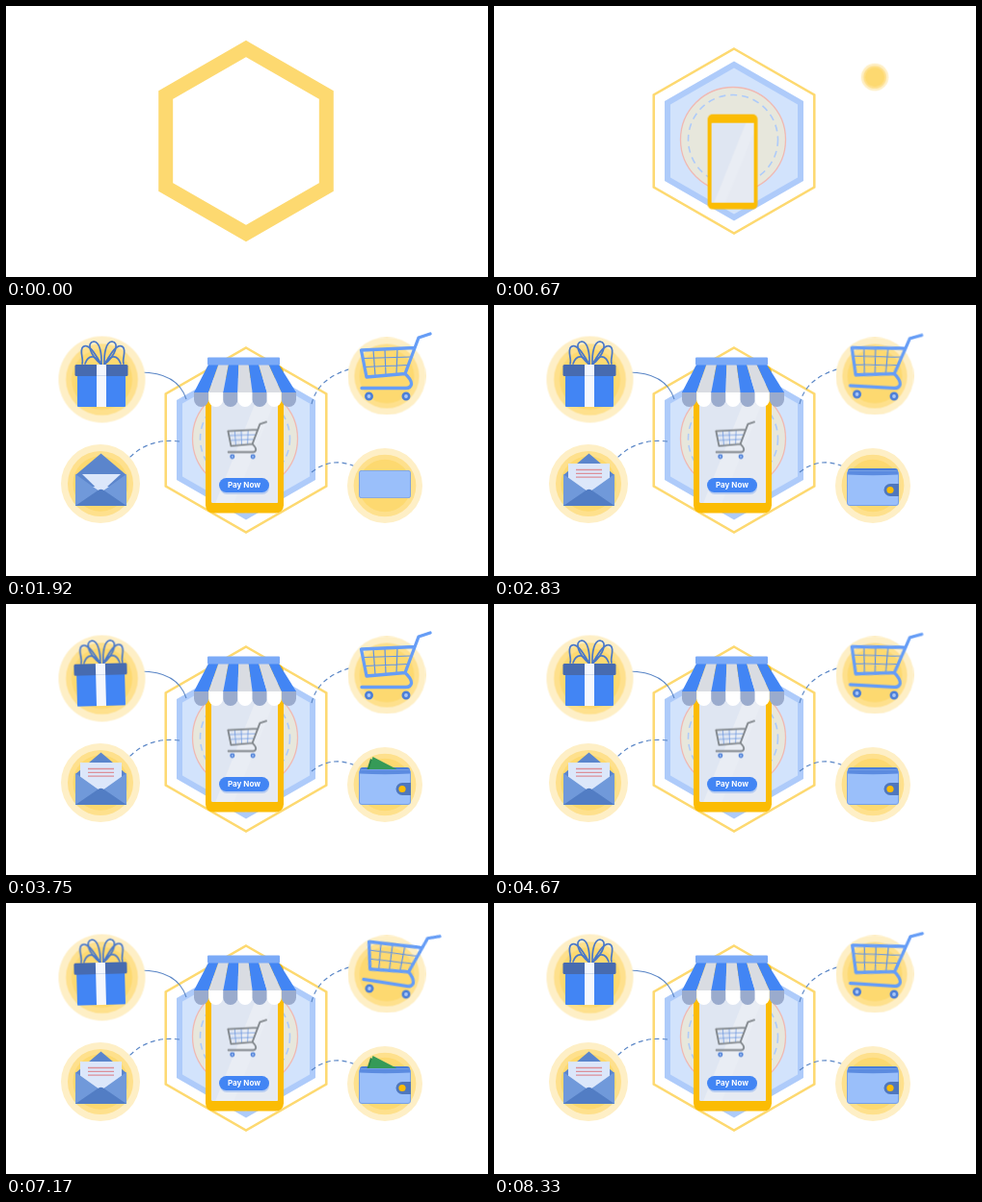
Recreate the animation shown at these times as an HTML page. Size 500x282 px, loop 8410 ms.

```html
<!DOCTYPE html>
<html lang="en">
<head>
<meta charset="utf-8">
<title>Mobile shop</title>
<style>
html, body { margin: 0; width: 100%; height: 100%; overflow: hidden; background: #fff; }
svg { display: block; width: 100vw; height: 100vh; }
g, path, circle, rect { stroke-linejoin: round; }
.line { fill: none; stroke-linecap: round; }
.anim { animation: 8410ms ease-out infinite; }

#frame { animation-name: thin; }
#core { animation-name: core; transform-origin: 249px 140.5px; }
#phone { animation-name: phone; transform-origin: 247.5px 202.5px; }
#awning { animation-name: awning; transform-origin: 248px 54px; }
#goods { animation-name: goods; transform-origin: 250px 142px; }
#button { animation-name: button; transform-origin: 247px 188px; }
#disc1 { animation-name: disc1; transform-origin: 395px 74px; }
#disc2 { animation-name: disc2; transform-origin: 99.5px 77.5px; }
#disc3 { animation-name: disc3; transform-origin: 98px 186px; }
#disc4 { animation-name: disc4; transform-origin: 393px 188px; }
#cartIn { animation-name: cartIn; transform-origin: 395px 74px; }
#cartTip { animation-name: tip; animation-timing-function: ease-in-out; transform-origin: 415px 95px; }
#gift { animation-name: disc2; transform-origin: 99px 106px; }
#giftSway { animation-name: sway; animation-timing-function: ease-in-out; transform-origin: 99px 106px; }
#mail { animation-name: disc3; transform-origin: 98px 209px; }
#letter { animation-name: letter; }
#wallet { animation-name: wallet; transform-origin: 393px 172px; }
.trim { animation-name: trim; }
#cash { animation-name: cash; animation-timing-function: ease-in-out; }
.draw { animation-name: draw; stroke-dasharray: 1; }

@keyframes thin { 0% { stroke-width: 15px } 6%, 100% { stroke-width: 2.5px } }
@keyframes core { 0%, 2% { transform: scale(0) } 6.5%, 100% { transform: none } }
@keyframes phone { 0%, 5.5% { transform: scale(0) } 10.9%, 100% { transform: none } }
@keyframes awning { 0%, 10.9% { transform: scale(1, 0) } 14.9%, 100% { transform: none } }
@keyframes goods { 0%, 13.9% { transform: scale(0) } 17.8%, 100% { transform: none } }
@keyframes button { 0%, 15.9% { transform: scale(0) } 19.8%, 100% { transform: none } }
@keyframes disc1 { 0%, 7.1% { transform: scale(0) } 10.9%, 100% { transform: none } }
@keyframes disc2 { 0%, 11.9% { transform: scale(0) } 15.9%, 100% { transform: none } }
@keyframes disc3 { 0%, 14.9% { transform: scale(0) } 18.9%, 100% { transform: none } }
@keyframes disc4 { 0%, 16.8% { transform: scale(0) } 20.8%, 100% { transform: none } }
@keyframes cartIn { 0%, 10.9% { transform: scale(0) } 15.9%, 100% { transform: none } }
@keyframes tip {
  0%, 22.8%, 44.6%, 66.4%, 88.2% { transform: none }
  27.6%, 49.4%, 71.2%, 93% { transform: rotate(13.5deg) }
  32.7%, 54.5%, 76.3%, 98.1% { transform: rotate(3deg) }
  40%, 41.8%, 61.8%, 63.6%, 83.6%, 85.4% { transform: rotate(9deg) }
  100% { transform: rotate(4.5deg) }
}
@keyframes sway {
  0%, 22.8%, 33.7%, 55.5%, 67.4%, 77.3%, 99%, 100% { transform: none }
  28%, 44.6%, 61%, 72%, 85.3%, 93% { transform: rotate(-1.5deg) }
}
@keyframes letter { 0%, 23.2% { transform: translateY(24px) } 31%, 100% { transform: none } }
@keyframes wallet { 0%, 18.8% { transform: scale(0) } 22.8% { transform: scale(1, .78) } 24.8%, 100% { transform: none } }
@keyframes trim { 0%, 22.9% { opacity: 0 } 24.8%, 100% { opacity: 1 } }
@keyframes cash {
  0%, 32%, 59%, 71%, 94%, 100% { transform: translateY(19px) }
  38%, 50%, 79%, 87% { transform: none }
}
@keyframes draw { 0%, 17% { stroke-dashoffset: 1 } 21.5%, 100% { stroke-dashoffset: 0 } }
</style>
</head>
<body>
<svg viewBox="0 0 500 282" preserveAspectRatio="none">
  <defs>
    <g id="disc">
      <circle r="1" fill="#feefc6"/>
      <circle r=".83" fill="#fee08c"/>
      <circle r=".7" fill="#fdd970"/>
    </g>
    <g id="trolley" class="line">
      <path d="M381 46.500 383 73.500M393 46 394 73M406 45.500 405 72M370 55.500 420 54M372 64.500 417 62.500" stroke="var(--grid)" stroke-width="1.200"/>
      <path d="M440 30 428 34 414 71.500 374 75 368.500 47 424 44.500M414 71.500Q421 78 420.500 82.500Q419.500 86.500 415 86.500H369" stroke="var(--bar)" stroke-width="3.300"/>
      <g fill="#a9c7fa" stroke="var(--wheel)" stroke-width="2.600">
        <circle cx="376.500" cy="95" r="3.200"/><circle cx="415" cy="95" r="3.200"/>
      </g>
    </g>
    <g id="loops">
      <path d="M99 62C93 52 86 39 80 43.500C75.500 47 81 57 79 61"/>
      <path d="M99 62C87 52 83 39 91 38C97 38 99.500 50 99 62"/>
      <path d="M99 62C94 53 86 50 82 61"/>
    </g>
    <clipPath id="screen"><rect x="213" y="76" width="69" height="130" rx="1.500"/></clipPath>
    <clipPath id="mouth"><path d="M66 140H131V176L98.500 195 66 176Z"/></clipPath>
    <clipPath id="slot"><path d="M360 150H428V177H360Z"/></clipPath>
    <g id="links">
      <path pathLength="var(--unit)" d="M187 98Q178 70 139 70"/>
      <path d="M317 103Q324 74 363 65"/>
      <path d="M180 142Q148 138 127 160"/>
      <path d="M317 174Q338 157 363 168.500"/>
    </g>
    <mask id="reveal" maskUnits="userSpaceOnUse" x="0" y="0" width="500" height="282">
      <g fill="none" stroke="#fff" stroke-width="6">
        <path class="anim draw" pathLength="1" d="M187 99Q178 70 138 70"/>
        <path class="anim draw" pathLength="1" d="M317 104Q324 74 364 65"/>
        <path class="anim draw" pathLength="1" d="M181 142Q148 138 126 161"/>
        <path class="anim draw" pathLength="1" d="M316 175Q338 157 364 169"/>
      </g>
    </mask>
  </defs>

  <path id="frame" class="anim" d="M249 44.500 332.300 92.500V188.500L249 236.500 165.700 188.500V92.500Z" fill="none" stroke="#fdd970" style="stroke-linejoin:miter"/>

  <g id="core" class="anim">
    <path d="M249 57.500 321 99V182L249 223.500 177 182V99Z" fill="#aecbfa"/>
    <path d="M249 64.500 315 102.500V178.500L249 216.500 183 178.500V102.500Z" fill="#d2e3fc"/>
    <circle cx="248" cy="139" r="54.500" fill="#e7e7dc" stroke="#f0b9b3" stroke-width="1.300"/>
    <circle cx="248" cy="139" r="46.500" fill="none" stroke="#aecbfa" stroke-width="1.600" stroke-dasharray="7 5"/>
  </g>

  <g mask="url(#reveal)">
    <use href="#links" fill="none" stroke="#5a86c6" stroke-width="1.150" stroke-dasharray="5 3.500"/>
  </g>

  <g id="phone" class="anim">
    <rect x="207" y="62" width="81" height="154.500" rx="8" fill="#fbbc04"/>
    <g clip-path="url(#screen)">
      <rect x="213" y="76" width="69" height="131" fill="#dfe6f2"/>
      <path d="M282 76V207H217L269 76Z" fill="#e6eaf2"/>
      <path d="M269 76H282V92L236 207H217Z" fill="#e9edf4"/>
    </g>
  </g>
  <g id="goods" class="anim" style="--bar:#80868b;--grid:#5f8fdc;--wheel:#4d7fd6">
    <use href="#trolley" transform="translate(25.800 105) scale(.555)"/>
  </g>
  <g id="button" class="anim">
    <rect x="222" y="182" width="51" height="15" rx="7" fill="#b5cbf0"/>
    <rect x="221" y="180" width="52" height="15" rx="7.500" fill="#4285f4"/>
    <text x="247" y="190.300" text-anchor="middle" font-family="Inter, sans-serif" font-weight="700" font-size="8" fill="#fff">Pay Now</text>
  </g>

  <g id="awning" class="anim">
    <g id="stripes"></g>
    <rect x="209" y="54.500" width="75" height="8" rx="1" fill="#7baaf7"/>
  </g>

  <g id="disc1" class="anim"><use href="#disc" transform="translate(395 74) scale(40.500)"/></g>
  <g id="disc2" class="anim"><use href="#disc" transform="translate(99.500 77.500) scale(45)"/></g>
  <g id="disc3" class="anim"><use href="#disc" transform="translate(98 186) scale(41)"/></g>
  <g id="disc4" class="anim"><use href="#disc" transform="translate(393 188) scale(39)"/></g>

  <g id="cartIn" class="anim" style="--bar:#669df6;--grid:#5f92e6;--wheel:#4d7fd6">
    <g id="cartTip" class="anim"><use href="#trolley"/></g>
  </g>

  <g id="gift" class="anim">
    <g id="giftSway" class="anim">
      <g class="line" stroke="#4a78c8" stroke-width="1.700">
        <use href="#loops"/>
        <use href="#loops" transform="translate(201 0) scale(-1 1)"/>
      </g>
      <rect x="74" y="73" width="50" height="33" rx="1" fill="#4285f4"/>
      <rect x="71.500" y="62" width="55" height="12" rx="1.500" fill="#476bb0"/>
      <path d="M94 62H104V106H94Z" fill="#f4f7fd"/>
      <path d="M94 73.500H104" stroke="#d2dcef"/>
    </g>
  </g>

  <g id="mail" class="anim">
    <path d="M72 177 98.500 154.500 125 177V209H72Z" fill="#5b85cc"/>
    <g clip-path="url(#mouth)">
      <path d="M79 176H119L98.500 195Z" fill="#dce7fa"/>
      <g id="letter" class="anim">
        <path d="M77 165H120V200H77Z" fill="#dce7fa"/>
        <path d="M85 171.500H112M85 175.300H112M85 179.100H112" stroke="#dc8f98" stroke-width="1.300"/>
      </g>
    </g>
    <path d="M72 176 98.500 195 72 209ZM125 176 98.500 195 125 209Z" fill="#7099da"/>
    <path d="M72 209 96 192.500Q98.500 191 101 192.500L125 209Z" fill="#527dc4"/>
  </g>

  <g id="wallet" class="anim">
    <g class="anim trim">
      <rect x="367" y="170" width="52" height="20" rx="3" fill="#4a7dd6"/>
      <g clip-path="url(#slot)">
        <g id="cash" class="anim">
          <path d="M372 180 378 161 406 175 402 184Z" fill="#2c8449"/>
          <path d="M374 181 380.500 159 408.500 173.500 404 185Z" fill="#359a57"/>
        </g>
      </g>
    </g>
    <rect x="366.500" y="172.500" width="53" height="36" rx="2.500" fill="#9abffa" stroke="#759fe6"/>
    <g class="anim trim">
      <path d="M367 173H419V176.500Q393 178 367 176.500Z" fill="#5b8be0"/>
      <path d="M420 186H411A6.500 6.500 0 0 0 411 199H420Z" fill="#4f77bd"/>
      <circle cx="411" cy="192.500" r="3.600" fill="#fbbc04"/>
    </g>
  </g>
</svg>
<script>
// Seven awning stripes, each ending in a scallop.
const stripes = document.getElementById('stripes');
const add = (d, fill) => {
  const p = document.createElementNS('http://www.w3.org/2000/svg', 'path');
  p.setAttribute('d', d);
  p.setAttribute('fill', fill);
  stripes.append(p);
};
const upper = i => 210 + i * 73 / 7;
const lower = i => 195 + i * 106 / 7;
for (let i = 0; i < 7; i++) {
  const blue = i % 2 === 0;
  add(`M${lower(i)} 90H${lower(i + 1)}V98.500A7.570 7.570 0 0 1 ${lower(i)} 98.500Z`, blue ? '#9aabcd' : '#fff');
  add(`M${upper(i)} 62H${upper(i + 1)}L${lower(i + 1)} 91H${lower(i)}Z`, blue ? '#4285f4' : '#d9dce2');
}
</script>
</body>
</html>
```
